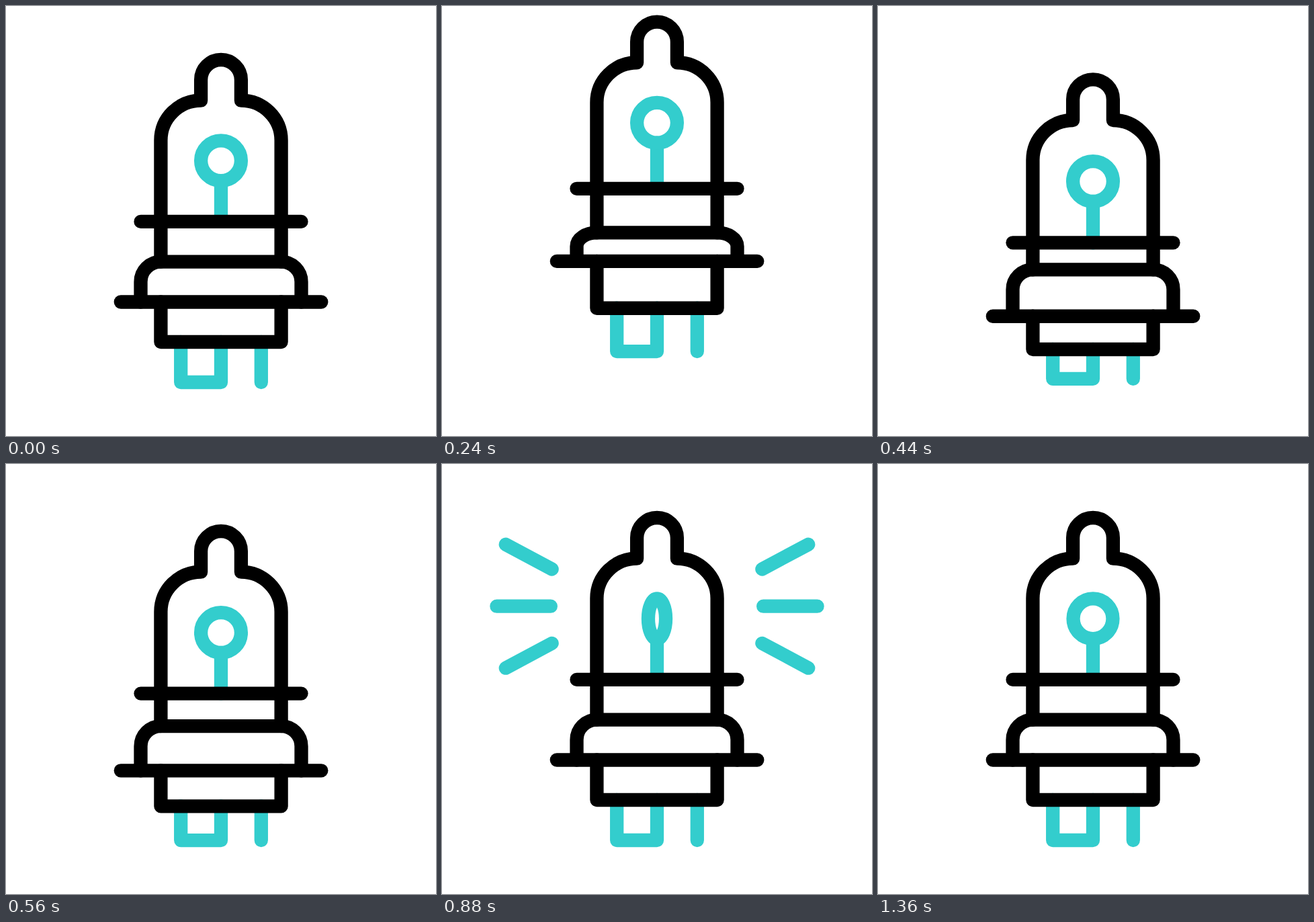
Recreate the animation shown at these times as an HTML page. Size 640 by 640 pixels, loop 1.48 s.

```html
<!DOCTYPE html>
<html lang="en">
<head>
<meta charset="utf-8">
<title>Bulb</title>
<style>
  html, body { margin: 0; width: 100%; height: 100%; overflow: hidden; background: #fff; }
  svg { display: block; width: 100vw; height: 100vh; }
  path, ellipse {
    fill: none; stroke: #000; stroke-width: 20.3;
    stroke-linecap: round; stroke-linejoin: round;
  }
  .glow { stroke: #33cdcd; }
</style>
</head>
<body>
<svg viewBox="0 0 640 640">
  <path id="rays" class="glow"/>
  <path id="pins" class="glow"/>
  <path id="stem" class="glow"/>
  <ellipse id="loop" class="glow" cx="320" ry="29.9"/>
  <path id="glass"/>
  <path id="ring"/>
  <path id="collar"/>
  <path id="flange"/>
  <path id="base"/>
</svg>
<script>
const TICK = 40, TICKS = 37;
const el = Object.fromEntries([...document.querySelectorAll('[id]')].map(e => [e.id, e]));

// Each level: resting y, offset at the top of the jump, offset when squashed
const levels = {
  top:    [80, -63, 40],
  loop:   [230.3, -63, 41.5],
  ring:   [320.9, -54.8, 41.4],
  collar: [380.7, -48.4, 18.7],
  bend:   [410.5, -59, 19.6],
  flange: [440.5, -67.7, 31.6],
  base:   [500, -56.1, 18.8],
  pins:   [560, -51.3, 0.2]
};

// Rays on the left side: inner x, y and outer x, y
const rays = [
  [165.5, 157.5, 70, 106.5],
  [164, 211.7, 52.5, 211.7],
  [165.5, 265.9, 70, 316.9]
];

const mix = (a, b, p) => a + (b - a) * p;

function ease(k, from, to) {
  const u = Math.min(1, Math.max(0, (k - from) / (to - from)));
  return u * u * (3 - 2 * u);
}

function level([rest, jump, squash], k) {
  const up = mix(0, jump, ease(k, 2, 7));
  const down = mix(up, squash, ease(k, 7, 12));
  return rest + mix(down, 0, ease(k, 12, 16));
}

function rayPath(k) {
  const lead = ease(k, 14, 26), trail = ease(k, 21, 33);
  if (lead <= trail) return '';
  return rays.map(([x0, y0, x1, y1]) => {
    const a = mix(x0, x1, trail), b = mix(y0, y1, trail);
    const c = mix(x0, x1, lead), d = mix(y0, y1, lead);
    return `M${a} ${b}L${c} ${d}M${640 - a} ${b}L${640 - c} ${d}`;
  }).join('');
}

function draw(k) {
  const y = {};
  for (const name in levels) y[name] = level(levels[name], k);
  const set = (name, d) => el[name].setAttribute('d', d);
  const neck = y.top + 29.9, shoulder = y.top + 60.7, side = y.top + 120;
  const bendR = y.bend - y.collar;

  set('glass', `M230.4 ${y.collar}V${side}A59.7 59.3 0 0 1 290.1 ${shoulder}V${neck}` +
    `A29.9 29.9 0 0 1 349.9 ${neck}V${shoulder}A59.7 59.3 0 0 1 409.6 ${side}V${y.collar}`);
  set('ring', `M200.5 ${y.ring}H439.5`);
  set('collar', `M200.5 ${y.flange}V${y.bend}A29.9 ${bendR} 0 0 1 230.4 ${y.collar}` +
    `H409.6A29.9 ${bendR} 0 0 1 439.5 ${y.bend}V${y.flange}`);
  set('flange', `M170.8 ${y.flange}H469.3`);
  set('base', `M230.4 ${y.flange}V${y.base}H409.6V${y.flange}`);
  set('pins', `M260.2 ${y.base}V${y.pins}H320V${y.base}M379.8 ${y.base}V${y.pins}`);
  set('stem', `M320 ${y.loop + 29.9}V${y.ring}`);
  set('rays', rayPath(k));

  // The loop turns half way around its upright axis
  const turn = Math.abs(1 - 2 * ease(k, 15, 35));
  el.loop.setAttribute('cy', y.loop);
  el.loop.setAttribute('rx', Math.max(0.3, 29.9 * turn));
}

function play(now) {
  draw(Math.floor((now + 0.5) / TICK) % TICKS);
  requestAnimationFrame(play);
}

draw(0);
requestAnimationFrame(play);
</script>
</body>
</html>
```
